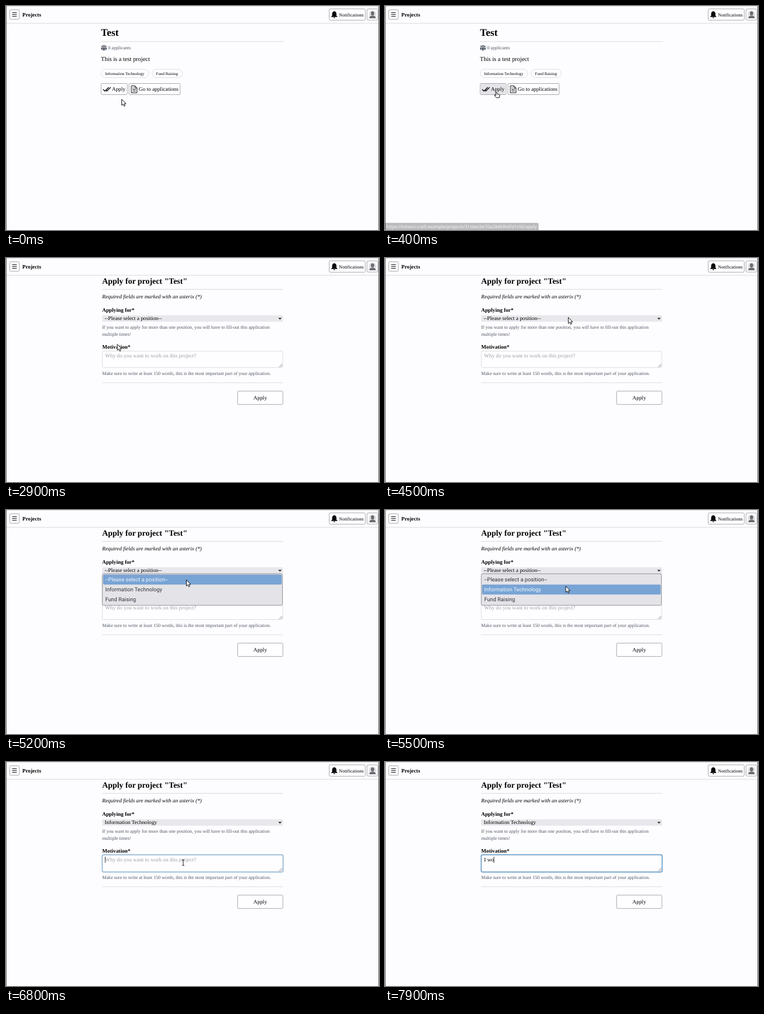
An HTML page for the animation above (8 s loop, 640x383 px).

```html
<!DOCTYPE html>
<html lang="en">
<head>
<meta charset="utf-8">
<title>Project application</title>
<style>
  html, body { margin: 0; width: 100%; height: 100%; overflow: hidden; background: #fdfcfe; }
  svg { display: block; width: 100%; height: 100%; }
  text { font: 9.28px "Liberation Serif", "Times New Roman", serif; fill: #000; white-space: pre; text-rendering: geometricPrecision; }
  .bold { font-weight: bold; }
  .h1 { font-size: 17.4px; font-weight: bold; }
  .h2 { font-size: 13.92px; font-weight: bold; }
  .lead { font-size: 10.44px; }
  .small { font-size: 8.14px; }
  .tag { font-size: 6.96px; }
  .muted { fill: #4f5864; }
  .hint { fill: #a0a0a6; }
  .italic { font-style: italic; }
  .status { font: 7.54px "Noto Sans", sans-serif; fill: #e6e6ea; }
  .option { font-family: Roboto, sans-serif; fill: #34343a; }
  .button { fill: #fefdff; stroke: #96969c; stroke-width: .8; }
  .pill { fill: #fefdff; stroke: #d0d0d5; stroke-width: .7; }
  .rule { stroke: #d8d8dc; stroke-width: .9; }
  .line { fill: none; stroke: #111; }
</style>
</head>
<body>
<svg viewBox="0 0 640 383" preserveAspectRatio="none">
  <g id="header">
    <path class="rule" d="M0 29.5H640M0 .4H640"/>
    <rect class="button" x="6.4" y="6.4" width="16.4" height="16.4" rx="2"/>
    <path class="line" d="M10.5 11.5H18.5M10.5 14.6H18.5M10.5 17.7H18.5"/>
    <text class="bold" x="28" y="17.8">Projects</text>
    <rect class="button" x="554.6" y="4.9" width="61.8" height="19.4" rx="2"/>
    <path d="M563.3 9C565.8 9.3 567 11 567 13.5V16.5L568.6 18.2V18.8H558V18.2L559.6 16.5V13.5C559.6 11 560.8 9.3 563.3 9ZM561.9 19.5H564.7A1.4 1.4 0 0 1 561.9 19.5Z"/>
    <text class="small" x="571.3" y="17.6">Notifications</text>
    <rect class="button" x="619.4" y="5" width="18.6" height="19" rx="2"/>
    <rect x="622.8" y="8.4" width="12.2" height="12.4" rx="4" fill="#e3e2e6"/>
    <g fill="#6c6b70"><ellipse cx="628.9" cy="12.4" rx="2.9" ry="3.5"/><path d="M623.4 20.9C623.4 17.8 625.8 16.4 628.9 16.4S634.4 17.8 634.4 20.9Z"/></g>
  </g>

  <g id="project">
    <text class="h1" x="163" y="51">Test</text>
    <path class="rule" d="M163 60.8H477.3"/>
    <g fill="#4f5864">
      <circle cx="165" cy="69.1" r="1.3"/><circle cx="168" cy="68.3" r="1.5"/><circle cx="171" cy="69.1" r="1.3"/>
      <path d="M163.2 71H165.6V75.3H164.4L163.2 73.5ZM166.2 70.6H169.8V73.6L169 76.2H167L166.2 73.6ZM170.4 71H172.8V73.5L171.6 75.3H170.4Z"/>
    </g>
    <text class="small muted" x="175.2" y="74.4">0 applicants</text>
    <text class="lead" x="162.8" y="94.2">This is a test project</text>
    <rect class="pill" x="163.2" y="108.2" width="81.8" height="14.2" rx="7.1"/>
    <text class="tag" x="169.9" y="117.5">Information Technology</text>
    <rect class="pill" x="250.6" y="108.2" width="52" height="14.2" rx="7.1"/>
    <text class="tag" x="257.6" y="117.5">Fund Raising</text>
    <rect class="button" x="163.2" y="132.5" width="44.8" height="19" rx="1.6"/>
    <rect id="hover" x="163.6" y="132.9" width="44" height="18.2" rx="1.3" fill="#e4e4e9"/>
    <path class="line" stroke-width="1.4" d="M166.6 142.5 169.7 145.6 176.3 138.9M171.6 144.2 173 145.6 179.6 138.9"/>
    <text x="181.8" y="145.3">Apply</text>
    <rect class="button" x="211" y="132.5" width="87.8" height="19" rx="1.6"/>
    <path class="line" d="M215 136.6H221.5L224.8 140V148.4H215ZM221.3 136.8V140.3H224.6M217 142.6H222.8M217 145.3H222.8M217 140H219"/>
    <text x="227.8" y="145.3">Go to applications</text>
    <g id="status">
      <path d="M0 370.7H261Q263.6 370.7 263.6 373.3V383H0Z" fill="#3a3a3f"/>
      <text class="status" x="2.6" y="380.1">https://tolveni-craft.example/projects/31daecbe70a28469b5fd1c92/apply</text>
    </g>
  </g>

  <g id="form">
    <text class="h2" x="165" y="43.9">Apply for project "Test"</text>
    <path class="rule" d="M165 53.6H475.3M165 213.2H475.3"/>
    <text class="italic" x="165" y="68.9">Required fields are marked with an asterix (*)</text>
    <text class="bold" x="165" y="92.1">Applying for*</text>
    <rect x="165" y="98" width="310.2" height="10.8" fill="#e8e7ec"/>
    <text id="selected" x="169.2" y="106.1"></text>
    <path class="line" stroke-width="1.3" d="M468 102.2 470.1 104.3 472.2 102.2"/>
    <text class="small muted" x="165" y="121.1">If you want to apply for more than one position, you will have to fill-out this application</text>
    <text class="small muted" x="165" y="132.6">multiple times!</text>
    <text class="bold" x="165" y="154.9">Motivation*</text>
    <rect class="pill" x="165.3" y="159.2" width="309.6" height="28.2" rx="2"/>
    <rect id="focus" x="165" y="158.6" width="310.6" height="29.6" rx="2.6" fill="none" stroke="#629cc9" stroke-width="1.5"/>
    <path d="M468.5 186.5 474 181M471.3 186.5 474 183.8" stroke="#77777c" stroke-width=".8"/>
    <text id="hint" class="hint" x="170" y="170">Why do you want to work on this project?</text>
    <text id="typed" x="170" y="170"></text>
    <path id="caret" d="M0 161.8V172.4" stroke="#000" stroke-width=".8"/>
    <text class="small muted" x="165" y="200.2">Make sure to write at least 150 words, this is the most important part of your application.</text>
    <rect class="button" x="397.5" y="227.6" width="77.6" height="22.8" rx="1.6"/>
    <text x="436.2" y="242" text-anchor="middle">Apply</text>
    <g id="menu">
      <rect x="165.2" y="109" width="309.2" height="54" rx="2.5" fill="#e4e3e8" stroke="#85858a" stroke-width=".9"/>
      <rect id="highlight" x="167" width="305.6" height="16.2" rx="1.2" fill="#78a4d5" stroke="#5b8fc8" stroke-width=".6"/>
    </g>
  </g>

  <path d="M.4 0V383M639.6 0V383" stroke="#4a4a4e" stroke-width=".9"/>
  <g id="cursor" stroke="#000" stroke-width=".9" fill="#fff" stroke-linejoin="round">
    <path id="arrow" d="M0 0V10.4L2.5 8.2 4.2 11.9 5.9 11.1 4.3 7.6H7.5Z"/>
    <path id="hand" d="M-1.2 0Q-.3-1.7.7-.2L1.2 3 4.7 3.6Q6 4 5.8 5.5L5.2 9.3H.1L-3.3 5.6Q-3.3 4.3-2 4.7L-.7 5.6Z"/>
    <path id="beam" fill="none" d="M-2-5Q0-5 0-4V4Q0 5-2 5M2-5Q0-5 0-4M0 4Q0 5 2 5"/>
  </g>
</svg>
<script>
const LOOP = 8000, STEP = 100;
const OPTIONS = ['--Please select a position--', 'Information Technology', 'Fund Raising'];
const el = id => document.getElementById(id);
const show = (id, opacity) => el(id).setAttribute('opacity', Number(opacity));
const ramp = (t, from, to) => Math.min(1, Math.max(0, (t - from) / (to - from)));

// Pointer path: time, x, y
const PATH = [
  [0, 198.5, 159.5], [200, 191, 147.5], [3600, 191, 147.5], [3800, 323, 95],
  [4200, 323, 95], [4500, 314.5, 101.5], [4700, 314.5, 101.5], [5100, 309.5, 119.5],
  [5200, 309.5, 119.5], [5700, 310.5, 137.5], [6100, 310.5, 137.5], [6600, 304, 172]
];
const KEY_TIMES = [7200, 7400, 7600, 7900];

const options = OPTIONS.map((label, i) => {
  const text = document.createElementNS(el('menu').namespaceURI, 'text');
  text.setAttribute('class', 'option');
  text.setAttribute('x', 170.2);
  text.setAttribute('y', 122.1 + 17 * i);
  text.textContent = label;
  return el('menu').appendChild(text);
});

function pointerAt(t) {
  const next = PATH.findIndex(p => p[0] > t);
  if (next < 0) return PATH.at(-1).slice(1);
  const [a, b] = [PATH[next - 1], PATH[next]];
  const k = ramp(t, a[0], b[0]);
  return [a[1] + (b[1] - a[1]) * k, a[2] + (b[2] - a[2]) * k];
}

function draw(t) {
  const onForm = t >= 2900;
  const [x, y] = pointerAt(t);
  show('project', !onForm);
  show('form', onForm);
  show('hover', ramp(t, 0, 200));
  show('status', ramp(t, 300, 600));

  const row = t >= 5200 && y > 127 ? 1 : 0;
  show('menu', t < 5900 ? ramp(t, 4600, 4800) : 0);
  el('highlight').setAttribute('y', 110.9 + 17 * row);
  options.forEach((text, i) => text.style.fill = i === row ? '#f4f6fb' : '');
  el('selected').textContent = OPTIONS[t >= 5900 ? 1 : 0];

  const typed = 'I wo'.slice(0, KEY_TIMES.filter(k => t >= k).length);
  el('typed').textContent = typed;
  show('hint', !typed);
  show('focus', ramp(t, 6600, 6900));
  show('caret', t >= 6700);
  const caretX = 170.2 + (typed ? el('typed').getComputedTextLength() : 0);
  el('caret').setAttribute('transform', `translate(${caretX})`);

  const hand = t >= 100 && !onForm, beam = t > 6100 && y > 159;
  show('hand', hand);
  show('beam', beam);
  show('arrow', !hand && !beam);
  show('cursor', t < 7100);
  el('cursor').setAttribute('transform', `translate(${x} ${y})`);
}

const start = performance.now();
function frame() {
  const t = (performance.now() - start) % LOOP;
  draw(Math.floor(t / STEP) * STEP);
  requestAnimationFrame(frame);
}
frame();
</script>
</body>
</html>
```
